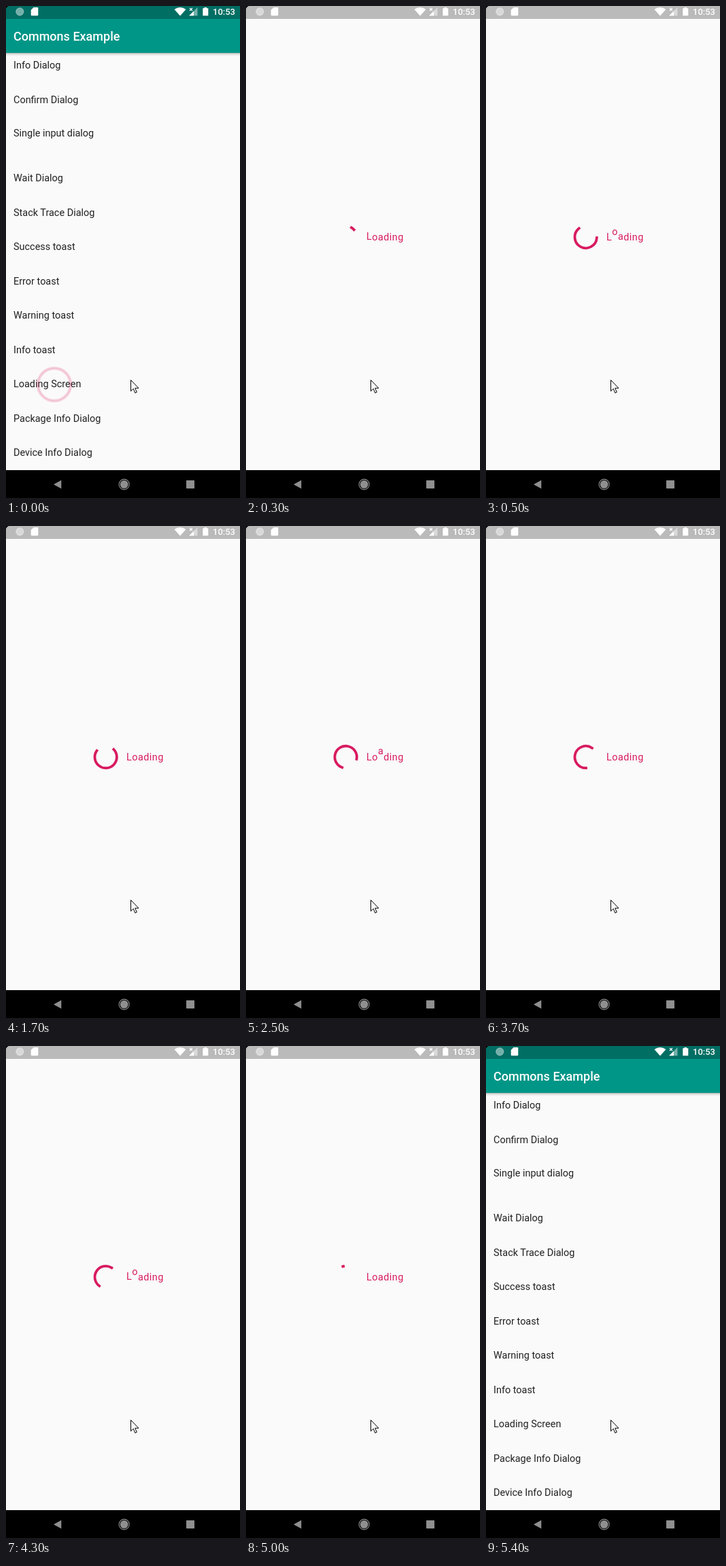
An HTML page for the animation above (5.7 s loop, 344 px wide and 724 px high).

```html
<!DOCTYPE html>
<html lang="en">
<head>
<meta charset="utf-8">
<title>Loading screen</title>
<style>
  html, body { margin: 0; width: 100%; height: 100%; overflow: hidden; background: #fafafa; }
  svg { display: block; width: 100%; height: 100%; }
  text { font-family: Roboto, sans-serif; white-space: pre; }
  #items text { font-size: 14.45px; fill: #212121; }
</style>
</head>
<body>
<svg viewBox="0 0 344 724" xmlns="http://www.w3.org/2000/svg">
  <defs>
    <linearGradient id="shade" x2="0" y2="1">
      <stop stop-color="#000" stop-opacity=".3"/>
      <stop offset=".4" stop-color="#000" stop-opacity=".1"/>
      <stop offset="1" stop-color="#000" stop-opacity="0"/>
    </linearGradient>
  </defs>

  <rect width="344" height="724" fill="#fafafa"/>
  <rect width="344" height="19" fill="#006e63"/>
  <rect y="19" width="344" height="50" fill="#009687"/>
  <rect y="69" width="344" height="5" fill="url(#shade)"/>
  <text x="11" y="51" font-size="18" font-weight="500" fill="#fff">Commons Example</text>
  <g id="items"></g>

  <g id="ring" fill="none" stroke="#d81b60">
    <circle cx="71" cy="557" r="24" stroke-width="5" opacity=".13"/>
    <circle cx="71" cy="557" r="24" stroke-width="2.5" opacity=".13"/>
  </g>

  <g id="loading">
    <rect width="344" height="683" fill="#fafafa"/>
    <rect width="344" height="19" fill="#bababa"/>
    <path id="arc" fill="none" stroke="#d81b60" stroke-width="3.8" stroke-linecap="square"/>
    <text id="word" x="177" y="345" font-size="14.45" letter-spacing=".45" fill="#d81b60"></text>
  </g>

  <!-- status icons -->
  <path d="M0 0H4Q1 1 0 4Z" fill="#000"/>
  <circle cx="20.3" cy="8.3" r="5.6" fill="#fff" fill-opacity=".45" stroke="#fff" stroke-opacity=".4"/>
  <g fill="#fff">
    <path d="M40.5 2H46Q47.3 2 47.3 3.3V13Q47.3 14.3 46 14.3H38Q36.7 14.3 36.7 13V6Z"/>
    <path d="M247.5 5Q256 -1 264.5 5L256 14.5Z"/>
    <path d="M281.5 2V14.3H269.2Z" opacity=".45"/>
    <path d="M276 7.5V14.3H269.2Z"/>
    <path d="M291.5 2H295V3.2H297.3V14.3H289.3V3.2H291.5Z"/>
    <text x="304" y="13" font-size="13" font-weight="500">10:53</text>
  </g>
  <path d="M270 3L274 7M274 3L270 7" stroke="#fff" stroke-width="1.2"/>

  <!-- navigation bar -->
  <rect y="683" width="344" height="41" fill="#000"/>
  <g fill="#8f8f8f">
    <path d="M70 704L81.3 697.8V710.2Z"/>
    <circle cx="173.7" cy="704" r="5.9"/>
    <circle cx="173.7" cy="704" r="7.6" fill="none" stroke="#8f8f8f" stroke-width="1.1"/>
    <rect x="265" y="698" width="12" height="12" rx=".8"/>
  </g>

  <path d="M183.5 550.5V566.8L187.2 563.2L189.8 569.4L192.3 568.3L189.7 562.3H194.9Z"
        fill="#fff" stroke="#000" stroke-linejoin="round"/>
</svg>
<script>
const LOOP = 5700;
const STEP = 100;
const $ = id => document.getElementById(id);
const NS = 'http://www.w3.org/2000/svg';

function addText(parent, tag, content, attrs = {}) {
  const el = document.createElementNS(NS, tag);
  el.textContent = content;
  for (const k in attrs) el.setAttribute(k, attrs[k]);
  return parent.appendChild(el);
}

const top3 = [['Info Dialog', 92], ['Confirm Dialog', 143], ['Single input dialog', 192]];
const rest = ['Wait Dialog', 'Stack Trace Dialog', 'Success toast', 'Error toast', 'Warning toast',
  'Info toast', 'Loading Screen', 'Package Info Dialog', 'Device Info Dialog'];
const rows = top3.concat(rest.map((label, i) => [label, 258 + i * 50.5]));
rows.forEach(([label, y]) => addText($('items'), 'text', label, { x: 11, y }));
const letters = [...'Loading'].map(c => addText($('word'), 'tspan', c));

// Linear interpolation through [time, value] points
function track(points, t) {
  if (t <= points[0][0]) return points[0][1];
  for (let i = 1; i < points.length; i++) {
    const [t0, a] = points[i - 1], [t1, b] = points[i];
    if (t <= t1) return a + (b - a) * (t - t0) / (t1 - t0);
  }
  return points[points.length - 1][1];
}

const SCREEN = [[100, 0], [200, .5], [300, 1], [5100, 1], [5200, .6], [5300, .12], [5400, 0]];
const RING = [[0, 1], [100, .5], [200, 0]];
// Spinner progress, in trim cycles
const SPIN = [[228, 0], [500, .281], [1700, 1.56], [2500, 2.39], [3700, 3.617], [4300, 4.21], [5400, 5.346]];

// Cubic ease over the first half of a cycle, then hold
function ease(x) {
  if (x <= 0) return 0;
  if (x >= .5) return 1;
  let lo = 0, hi = 1;
  for (let i = 0; i < 24; i++) {
    const s = (lo + hi) / 2, r = 1 - s;
    if (.6 * r * r * s + .3 * r * s * s + .5 * s ** 3 < x) lo = s; else hi = s;
  }
  return 3 * lo * lo - 2 * lo ** 3;
}

function point(deg) {
  const a = deg * Math.PI / 180, r = 16.2;
  return (146.7 + r * Math.sin(a)).toFixed(2) + ' ' + (340 - r * Math.cos(a)).toFixed(2);
}

function drawSpinner(t) {
  const p = track(SPIN, t), cycle = Math.floor(p), u = p - cycle;
  const base = 306 * p + 270 * cycle + 8;
  const tail = base + 270 * ease(u - .5);
  const head = Math.max(base + 270 * ease(u), tail + .5);
  $('arc').setAttribute('d', `M${point(tail)}A16.2 16.2 0 ${head - tail > 180 ? 1 : 0} 1 ${point(head)}`);
}

const WAVE = 1925, FIRST = 375, DELAY = 100, HALF = 82, HEIGHT = 8.5;

function drawWord(t) {
  let last = 0;
  letters.forEach((el, i) => {
    const d = t - FIRST - i * DELAY;
    const off = d - WAVE * Math.max(0, Math.round(d / WAVE));
    const lift = Math.abs(off) < HALF ? Math.round(HEIGHT * Math.cos(off / HALF * Math.PI / 2)) : 0;
    el.setAttribute('dy', last - lift);
    last = lift;
  });
}

function draw(now) {
  const t = Math.floor((now % LOOP) / STEP) * STEP;
  const shown = track(SCREEN, t);
  $('loading').setAttribute('opacity', shown);
  $('ring').setAttribute('opacity', t < 5400 ? track(RING, t) : 0);
  const held = Math.min(t, 5000);
  drawSpinner(held);
  drawWord(held);
}

const start = performance.now();
function tick() {
  draw(performance.now() - start);
  requestAnimationFrame(tick);
}
tick();
</script>
</body>
</html>
```
